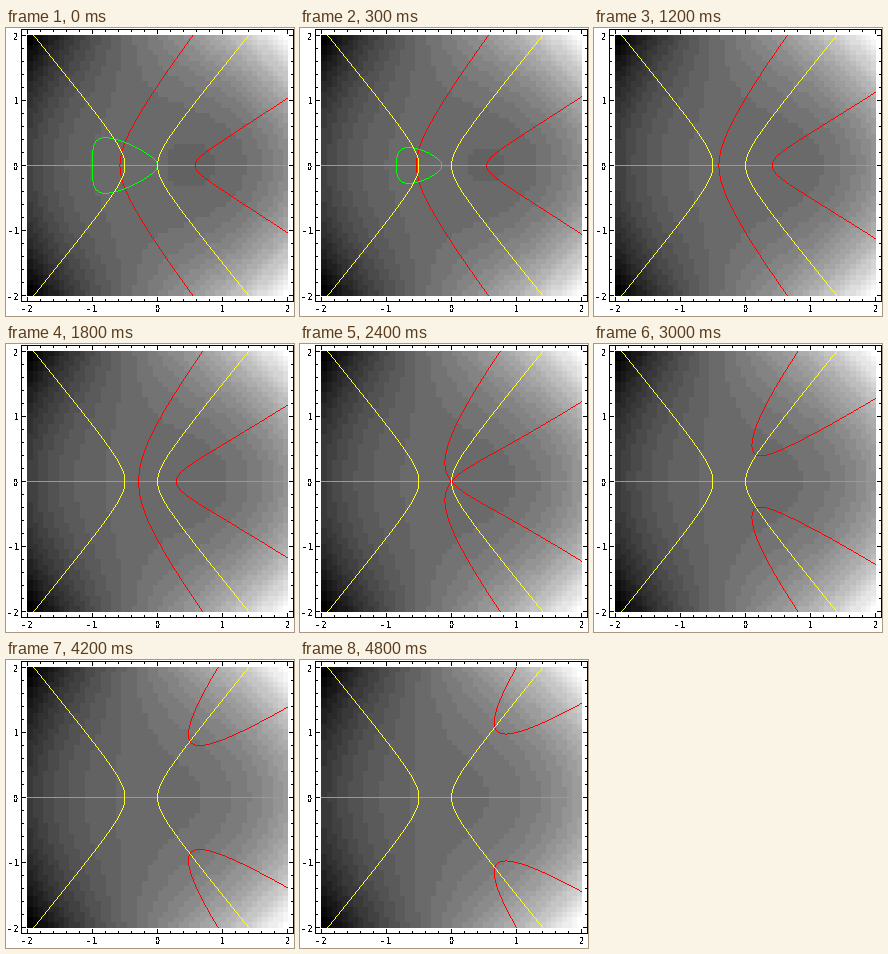
Write a matplotlib script that moves like this. It is 288 px wide and 288 px high and loops after 5100 ms.

```python
import numpy as np
import matplotlib.pyplot as plt
from matplotlib.animation import FuncAnimation

W = H = 288
DPI = 72            # one point equals one pixel
FRAMES, STEP = 17, 300
UNIT = 65           # pixels per data unit
SIDE = 4 * UNIT + 1
X0, Y0 = 151.5, 137.5
LEFT, RIGHT, TOP, BOTTOM = 15.5, 287.5, 1.5, 273.5
BANDS, CELLS = 32, 50

RED, GREEN, YELLOW, GREY = (1, 0, 0), (0, 1, 0), (1, 1, 0.15), (0.6, 0.6, 0.6)

plt.rcParams.update({
    "font.family": "DejaVu Sans",
    "font.size": 8,
    "text.antialiased": False,
})


def surface(x, y, a):
    return x**3 + 2 * x * y**2 + y**2 - a * x


def extremal(x, y, a, sign):
    """One sheet of the curve where the gradient is a Hessian eigenvector."""
    gx = 3 * x**2 + 2 * y**2 - a
    root = np.sqrt((1 - x)**2 + 16 * y**2)
    return gx - (2 * x + 1) * (x - 1 + sign * root) / 2


def hessian_det(x, y):
    return 12 * x * (2 * x + 1) - 16 * y**2


# Pixel centres for the curves, coarser cells for the shading
axis = np.linspace(-2, 2, SIDE)
X, Y = np.meshgrid(axis, axis)
cell = np.arange(SIDE) * CELLS // SIDE
steps = np.linspace(-2, 2, CELLS)[cell]
SX, SY = np.meshgrid(steps, steps)


def shade(a):
    low, high = surface(-2, 2, a), surface(2, 2, a)
    band = np.floor((surface(SX, SY, a) - low) / (high - low) * BANDS)
    return np.clip(band, 0, BANDS - 1) / (BANDS - 1)


def trace(values):
    """Mask of a one-pixel line along the zero set."""
    dy, dx = np.gradient(values)
    return np.abs(values) <= 0.5 * np.maximum(np.abs(dx), np.abs(dy))


HESSIAN = trace(hessian_det(X, Y))


def render(a):
    rgb = np.repeat(shade(a)[:, :, None], 3, axis=2)
    rgb[SIDE // 2] = GREY
    rgb[trace(extremal(X, Y, a, 1))] = RED
    rgb[trace(extremal(X, Y, a, -1))] = GREEN
    rgb[HESSIAN] = YELLOW
    return rgb


fig = plt.figure(figsize=(W / DPI, H / DPI), dpi=DPI, facecolor="white")
ax = fig.add_axes([0, 0, 1, 1])
ax.axis("off")


def line(xs, ys):
    ax.plot(xs, ys, color="black", lw=0.9, antialiased=False, snap=False,
            solid_capstyle="butt")


def draw_frame():
    for y in (TOP, BOTTOM):
        line([LEFT - 0.4, RIGHT + 0.4], [y, y])
    for x in (LEFT, RIGHT):
        line([x, x], [TOP, BOTTOM])
    for k in range(-10, 11):
        size = 4 if k % 5 == 0 else 2.5
        x, y = X0 + UNIT * k / 5, Y0 - UNIT * k / 5
        line([x, x], [BOTTOM, BOTTOM - size])
        line([x, x], [TOP, TOP + size])
        line([LEFT, LEFT + size], [y, y])
        line([RIGHT, RIGHT - size], [y, y])
    for n in range(-2, 3):
        label = str(n).replace("-", "- ")
        ax.text(X0 + UNIT * n, 280.5, label, ha="center", va="center_baseline")
        ax.text(13, Y0 - UNIT * n + 0.5, label, ha="right",
                va="center_baseline")


draw_frame()
half = SIDE / 2
image = ax.imshow(render(1), origin="lower", interpolation="nearest",
                  aspect="auto",
                  extent=(X0 - half, X0 + half, Y0 + half, Y0 - half))
ax.set(xlim=(0, W), ylim=(H, 0))


def update(i):
    image.set_data(render(1 - i / 8))
    return [image]


anim = FuncAnimation(fig, update, frames=FRAMES, interval=STEP,
                     init_func=lambda: [image], repeat=True, repeat_delay=0)
plt.show()
```
